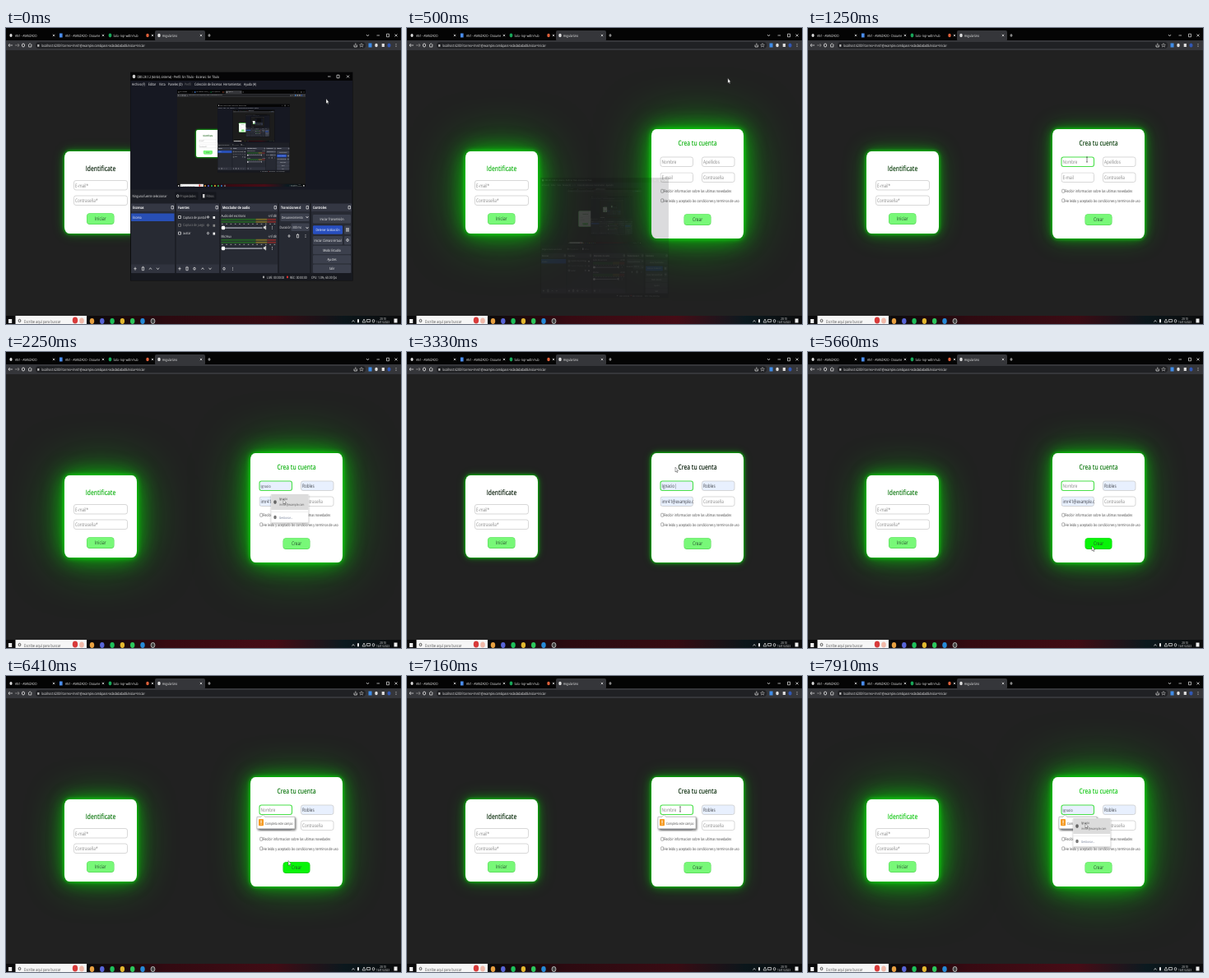
Recreate the animation shown at these times as an HTML page. Size 480 by 360 pixels, loop 8 s.

```html
<!DOCTYPE html>
<html lang="es">
<head>
<meta charset="utf-8">
<title>Formulario</title>
<style>
html, body { margin: 0; width: 100%; height: 100%; overflow: hidden; background: #212121; }
.card { position: absolute; background: #fff; border-radius: 6px / 8px; }
#login { left: 71px; top: 149.5px; width: 88px; height: 100.5px; }
#signup { left: 297px; top: 123px; width: 112px; height: 132.5px; }
svg { position: absolute; left: 0; top: 0; }
text { font-family: "Open Sans", "Noto Sans", sans-serif; text-rendering: geometricPrecision; white-space: pre; }
</style>
</head>
<body>
<div class="card" id="login"></div>
<div class="card" id="signup"></div>
<svg width="480" height="360" viewBox="0 0 480 360">
  <defs>
    <linearGradient id="tint">
      <stop offset="0" stop-color="#380a12" stop-opacity="0"/>
      <stop offset=".25" stop-color="#380a12"/>
      <stop offset=".6" stop-color="#480c16"/>
      <stop offset=".82" stop-color="#0b1a20"/>
      <stop offset="1" stop-color="#0b1a20" stop-opacity="0"/>
    </linearGradient>
    <filter id="soft" x="-50%" y="-50%" width="200%" height="200%"><feGaussianBlur stdDeviation="4"/></filter>
    <filter id="shade" x="-20%" y="-20%" width="140%" height="150%"><feGaussianBlur stdDeviation="1.2"/></filter>
    <clipPath id="mailClip"><rect x="307.5" y="175.5" width="40.5" height="12.5"/></clipPath>
    <clipPath id="screenClip"><rect width="480" height="360"/></clipPath>
  </defs>
  <g id="page"></g>
  <g id="bars"></g>
  <g id="obs"></g>
  <g id="pointer"></g>
</svg>
<script>
const LOOP = 8000, STEP = 1000 / 12, PULSE = 1750;
const NAME = 'Ignacio', SURNAME = 'Robles', MAIL = 'imr41@example.com';
const $ = id => document.getElementById(id);

const T = (x, y, s, size = 4.4, fill = '#f0f0f0', more = '') =>
  `<text transform="translate(${x} ${y}) scale(.75 1)" font-size="${size}" fill="${fill}" ${more}>${s}</text>`;
const C = (x, y, s, size, fill, more = '') => T(x, y, s, size, fill, `text-anchor="middle" ${more}`);
const R = (x, y, w, h, fill, rx = 0, more = '') =>
  `<rect x="${x}" y="${y}" width="${w}" height="${h}" rx="${rx}" fill="${fill}" ${more}/>`;
const D = (x, y, r, fill) => `<ellipse cx="${x}" cy="${y}" rx="${r * .8}" ry="${r}" fill="${fill}"/>`;
const P = (d, stroke = '#e8e8e8', w = .7, fill = 'none') =>
  `<path d="${d}" stroke="${stroke}" stroke-width="${w}" fill="${fill}"/>`;

const cross = (x, y, r = 1.2, c) => P(`M${x - r} ${y - r}l${2 * r} ${2 * r}m0 ${-2 * r}l${-2 * r} ${2 * r}`, c);
const plus = (x, y) => P(`M${x - 1.6} ${y}h3.2M${x} ${y - 2}v4`);
const bin = (x, y) => P(`M${x - 1.6} ${y - 1.6}h3.2m-.5 0v3.6h-2.2v-3.6m.6 -.8h1`);
const up = (x, y) => P(`M${x - 1.5} ${y + 1}l1.5 -2l1.5 2`);
const down = (x, y) => P(`M${x - 1.5} ${y - 1}l1.5 2l1.5 -2`);
const ring = (x, y, r = 1.5, c = '#e8e8e8') => `<ellipse cx="${x}" cy="${y}" rx="${r * .8}" ry="${r}" fill="none" stroke="${c}" stroke-width=".8"/>`;
const dots = (x, y, c = '#e8e8e8') => [-1.5, 0, 1.5].map(d => D(x, y + d, .5, c)).join('');

function browser() {
  let s = R(0, 0, 480, 15, '#040404') + R(181, 3, 61, 13, '#35363a', 2) + R(0, 15, 480, 12, '#35363a') +
    R(36, 17, 401, 8, '#202124', 4);
  s += D(6, 9, 2, '#ddd') + T(11, 10.5, 'AN1 - AVANZADO') + cross(58, 9);
  s += R(65, 6.5, 3.6, 5, '#4a8df0') + T(72, 10.5, 'AN1 - AVANZADO - Docume') + cross(118, 9);
  s += D(126.5, 9, 2.4, '#18a558') + T(130.5, 10.5, 'Sala - kqr-wdtn-hub') + D(172, 9, 2.2, '#e0603a') + cross(178, 9);
  s += D(186, 9, 2.2, '#ddd') + T(190, 10.5, 'AngularUno') + cross(237, 9) + plus(247, 9);
  s += down(439.5, 9) + P('M450.5 9h3.5M462.5 7.2h3v3.6h-3z') + cross(474, 9, 1.5);
  s += P('M8 21h-5l1.6 -2m-1.6 2l1.6 2') + P('M11 21h5l-1.6 -2m1.6 2l-1.6 2', '#999') + ring(21, 21, 2) +
    P('M27 21l2.2 -2.3l2.2 2.3m-.6 -.5v2.5h-3.2v-2.5');
  s += R(38.2, 20, 2.2, 2.8, '#bbb') + T(43, 22.6, `localhost:4200/?correo=${MAIL}&amp;pass=adadadadad&amp;Iniciar=Iniciar`, 4.5);
  s += P('M423 20.5v2.5h3.4v-2.5m-1.6 1v-3') + P('M432 18.6l.7 1.6h1.6l-1.2 1.2l.4 1.7l-1.5 -1l-1.5 1l.4 -1.7l-1.2 -1.2h1.6z', '#ccc', .5);
  return s + R(440.5, 18.5, 4, 5, '#3f8ce8') + D(450, 21, 2.2, '#ddd') + R(456.7, 19, 3.2, 4, '#ddd') + D(465.5, 21, 2.6, '#3158b5') + dots(474, 21);
}

function taskbar() {
  let s = R(0, 350, 480, 10, '#0a0a0b') + R(98, 350, 382, 10, 'url(#tint)', 0, 'class="tint"');
  s += R(3, 354, 4.2, 5, '#eee') + R(11.5, 350, 86.5, 10, '#f6f6f6') + ring(16.5, 356, 1.7, '#333') +
    T(22, 358.7, 'Escribe aquí para buscar', 5.2, '#555') + D(84, 355.5, 4, '#d83a3a') + D(92, 356, 3.5, '#f0b8a8');
  ['#e8a040', '#5865d8', '#1ec05a', '#e4b82e', '#2cc75c', '#2589d8'].forEach((c, i) => s += D(104.5 + i * 12.3, 356.5, 3.4, c));
  s += D(178.5, 356.5, 3.4, '#444') + ring(178.5, 356.5, 3, '#ccc');
  s += up(422, 356.5) + R(427, 354, 2, 4.5, '#eee', 1) + P('M433 358l2 -4l2 4z') + P('M438.5 354.5h4v3h-4z') + ring(446.5, 356.3, 1.7);
  return s + C(458, 354.7, '20:10', 4, '#eee') + C(458, 359.3, '16/01/2023', 4, '#eee') + R(471.5, 353.5, 4, 5, '#eee');
}

const field = (x, y, w, label, o = {}) =>
  R(x, y, w, 11.5, o.auto ? '#e8f0fe' : '#fff', 2.5, o.focus ? 'stroke="#4be04b" stroke-width="1.1"' : 'stroke="#c8c8c8" stroke-width=".7"') +
  T(x + 1.6, y + 8, o.value || label, o.small ? 4.8 : 6.2, o.value ? '#3a3d44' : '#858585');

const button = (x, y, w, label, hot) =>
  R(x, y + .3, w, 13.7, hot ? '#0ac80a' : '#52d652', 4) + R(x + .5, y + .6, w - 1, 12.7, hot ? '#08f408' : '#78f878', 3.6) +
  C(x + w / 2, y + 9.4, label, 6.4, '#244a2c');

const title = (x, y, s, c) => C(x, y, s, 8.9, c, 'font-weight="600"');

const login = c => title(115, 174, 'Identificate', c) + field(82.5, 185.5, 65, 'E-mail*') +
  field(82.5, 204, 65, 'Contraseña*') + button(98, 225, 33.5, 'Iniciar');

function miniScreen(depth) {
  return R(0, 0, 480, 360, '#1c1c1c') + R(70, 148.5, 90, 102.5, '#0f0', 8, 'filter="url(#soft)"') +
    R(71, 149.5, 88, 100.5, '#fff', 6) + login('#0c5a0c') + browser() + taskbar() + recorder(depth);
}

function recorder(depth) {
  const line = '#272a33', edge = '#3c404d', navy = '#161822';
  const key = (x, y, w, s, c = edge) => R(x, y, w, 10.4, c, 1.2) + C(x + w / 2, y + 6.8, s, 4.4, '#fff');
  let s = R(151.5, 54, 269.5, 253, '#1d1f26', 0, 'stroke="#08090b" stroke-width=".8"') + R(151.5, 54, 269.5, 10, '#050506') +
    D(155.5, 59, 2.3, '#ccc') + T(159.5, 60.7, 'OBS 28.1.2 (64-bit, sistema) - Perfil: Sin Título - Escenas: Sin Título', 4.4, '#fff') +
    P('M391 59h3.5M402 57.2h3v3.6h-3z') + cross(415.5, 59, 1.5) + R(151.5, 64, 269.5, 9, navy);
  [[153, 'Archivo (F)'], [173, 'Editar'], [186, 'Vista'], [197, 'Paneles (D)'], [217, 'Perfil'], [229, 'Colección de Escenas'],
    [264, 'Herramientas'], [289, 'Ayuda (H)']].forEach(([x, n]) => s += T(x, 70.2, n, 4.5, n == 'Perfil' ? '#777' : '#fff'));
  s += R(151.5, 73, 269.5, 123.5, navy) + R(208, 75, 156, 118, '#0d0d0f');
  if (depth) s += `<g transform="translate(208 75) scale(.325 .328)" clip-path="url(#screenClip)">${miniScreen(depth - 1)}</g>`;
  s += T(153.5, 206, 'Ninguna fuente seleccionar', 4.4) + R(205.5, 199.5, 28, 9.5, '#15171d', 1) + ring(208.7, 204.3) + T(211.5, 206, 'Propiedades', 4.4, '#999') +
    R(237, 199.5, 18.5, 9.5, '#15171d', 1) + R(239, 202, 2.5, 4.5, '#ccc') + T(243.5, 206, 'Filtros', 4.4, '#999');
  [[152, 53, 'Escenas'], [207, 52, 'Fuentes'], [261, 69, 'Mezclador de audio'], [332, 37, 'Transiciones d'], [371, 49, 'Controles']]
    .forEach(([x, w, n], i) => {
      s += R(x, 213.5, w, 10, '#343743') + T(x + 2, 220.3, n, 4.6, '#fff', 'font-weight="700"') + P(`M${x + w - 4} 216.5h2.5v3.5h-2.5z`) +
        R(x, 224, w, 74, line) + (i < 3 ? R(x, 287.5, w, 10.5, '#30333e') : '');
    });
  s += R(152, 225.5, 52.5, 9.5, '#284fb5') + T(154, 231.8, 'Escena', 4.4, '#fff');
  ['Captura de pantall', 'Captura de juego', 'avatar'].forEach((n, i) => {
    const y = 230 + i * 9.8, c = i == 1 ? '#888' : '#eee';
    s += P(`M209.5 ${y - 1.5}h3v3h-3z`, c) + T(215, y + 1.6, n, 4.4, c) + ring(245.5, y, 1.2, c) + R(251.5, y - 1, 2.6, 3, c);
  });
  ['Audio del escritorio', 'Mic/Aux'].forEach((n, i) => {
    const y = 229.8 + i * 25;
    s += T(261.5, y, n, 4.4) + T(318.5, y, '-inf dB', 4.4);
    [2, 5].forEach(d => s += R(261.5, y + d, 42, 2, '#255f25') + R(303.5, y + d, 14, 2, '#75692a') + R(317.5, y + d, 10.5, 2, '#7c2a2a'));
    for (let k = 0; k < 13; k++) s += R(262 + k * 5.3, y + 8, 1.6, 1.2, '#888');
    s += R(261.5, y + 12.7, 50, 1.2, '#b9bdc8') + R(262, y + 11, 4, 4.4, '#fff', 1) + P(`M313 ${y + 12}h1l1.8 -1.6v5l-1.8 -1.6h-1z`, '#ddd', .5, '#ddd') + dots(323.5, y + 13);
  });
  s += R(333.5, 225.5, 35, 9.6, edge, 1) + T(335, 232, 'Desvanecimiento', 4.3) + down(366, 230) + T(332.5, 243.8, 'Duración', 4.4) +
    R(346.5, 237.5, 22, 9.6, edge, 1) + T(348, 243.8, '300 ms', 4.4) + down(366, 243) + plus(344, 253) + bin(354.5, 253) + dots(364, 253);
  s += key(373, 227, 46, 'Iniciar Transmisión') + key(373, 240.3, 36, 'Detener Grabación', '#284fc0') + key(411, 240.3, 8, '') + R(413.5, 243, 1, 4.8, '#eee') + R(415.5, 243, 1, 4.8, '#eee') +
    key(373, 253, 36, 'Iniciar Cámara Virtual') + key(411, 253, 8, '') + ring(415, 258) + key(373, 264.8, 46, 'Modo Estudio') + key(373, 276.2, 46, 'Ajustes') + key(373, 287.5, 46, 'Salir');
  s += plus(157, 292.7) + bin(166.5, 292.7) + up(175.5, 292.7) + down(184.5, 292.7) + plus(211, 292.7) + bin(220, 292.7) + ring(229, 292.7) + up(239, 292.7) + down(248, 292.7) + ring(265, 292.7) + dots(275.5, 292.7);
  return s + R(151.5, 298.5, 269.5, 8.5, '#17191f') + D(313, 303, 1.4, '#aaa') + T(317, 304.8, 'LIVE: 00:00:00', 4.4) + D(342, 303, 1.4, '#d33') +
    T(345, 304.8, 'REC: 00:00:00', 4.4) + T(371, 304.8, 'CPU: 1.0%, 60.00 fps', 4.4);
}

const popup = hot => R(322, 174, 46, 35, '#000', 1, 'opacity=".25" filter="url(#shade)"') + R(322.3, 173, 45.2, 34.5, '#fff', 1) +
  (hot ? R(322.3, 173, 45.2, 19, '#dcdcdc') : '') + D(327, 182.6, 2.3, '#666') + T(332, 180.4, NAME, 4.1, '#444') +
  T(332, 187.4, MAIL, 4.1, '#555') + R(322.3, 194, 45.2, .5, '#ddd') + D(327, 201, 2.2, '#777') + T(332, 202.6, 'Gestionar...', 4.1, '#6d7892');

const warning = () => R(305.5, 172, 47, 16, '#000', 2, 'opacity=".5" filter="url(#shade)"') +
  P('M305 171.3h5l2.3 -2.6l2.3 2.6h36.4v14.5h-46z', '#a5a5a5', .6, '#fff') + R(307, 174, 6, 8.3, '#f59a23', 1) +
  R(309.6, 175.5, .9, 3.4, '#fff') + R(309.6, 179.7, .9, 1, '#fff') + T(315, 180.6, 'Completa este campo', 4.4, '#444');

const path = [[0, 389, 88], [250, 392, 59], [420, 392, 59], [1080, 339, 160], [1750, 339, 160], [2150, 337, 181], [2600, 337, 181],
  [3200, 326, 142], [5000, 326, 142], [5580, 345, 238], [6150, 345, 238], [6900, 332, 162], [7450, 332, 162], [7800, 337, 181], [LOOP, 337, 181]];
const ease = k => k * k * (3 - 2 * k);

function pointerAt(t) {
  const i = path.findIndex(p => p[0] > t), [t0, x0, y0] = path[i - 1], [t1, x1, y1] = path[i];
  const k = ease((t - t0) / (t1 - t0));
  return [x0 + (x1 - x0) * k, y0 + (y1 - y0) * k];
}

function pointer(x, y) {
  if (x > 308 && x < 347.5 && y > 157 && y < 168.5)
    return P(`M${x - 1} ${y - 3}h2m-1 0v6m-1 0h2`, '#333', .6);
  return P(`M${x} ${y - 2}v6l1.2 -1.2l.9 1.9l.8 -.4l-.8 -1.8h1.5z`, '#222', .4, '#fff');
}

function signup(t, color, x, y) {
  const within = (a, b) => t >= a && t < b;
  const preview = within(2080, 2500) || t >= 7740;
  const filled = t >= 2080, focus = t >= 1080;
  const left = Math.max(0, 7 - Math.max(0, Math.floor((t - 4350) / 110)));
  const name = preview ? NAME : t >= 2500 ? NAME.slice(0, left) : '';
  const caret = name && !preview && t % 1000 < 510 ? '|' : '';
  const hot = x > 337 && x < 369.5 && y > 226 && y < 240;
  let s = title(353, 143, 'Crea tu cuenta', color);
  s += field(308, 157, 39.5, 'Nombre', { value: name + caret, focus, small: preview, auto: preview || (name && left == 7) });
  s += field(358.5, 157, 39.5, 'Apellidos', { value: filled && SURNAME, auto: filled });
  s += `<g clip-path="url(#mailClip)">${field(308, 176, 39.5, 'E-mail', { value: filled && MAIL, auto: filled })}</g>` + field(358.5, 176, 39.5, 'Contraseña');
  ['Recibir informacion sobre las ultimas novedades', 'He leido y aceptado las condiciones y terminos de uso'].forEach((n, i) => {
    const top = 196.3 + i * 11.5;
    s += R(308.7, top, 3, 4, '#fff', .6, 'stroke="#666" stroke-width=".5"') + T(312.3, top + 4, n, 4.85, '#444');
  });
  s += button(336.5, 226, 33, 'Crear', hot);
  if (t >= 6000) s += warning();
  if (within(1750, 2500) || within(4410, 5200) || t >= 7450) s += popup(preview);
  return s;
}

$('bars').innerHTML = browser() + taskbar();
$('obs').innerHTML = recorder(3);
const tint = $('bars').querySelector('.tint');

function draw(now) {
  const t = Math.floor((now % LOOP) / STEP + .01) * STEP;
  const glow = (1 - Math.cos((t + 170) / PULSE * 2 * Math.PI)) / 2;
  const color = `rgb(${Math.round(8 + 14 * glow)},${Math.round(28 + 185 * glow ** 1.4)},${Math.round(10 + 14 * glow)})`;
  const green = a => `rgba(0,255,0,${a})`;
  const shadow = `0 0 ${3 + 4 * glow}px ${green(.9)}, 0 0 ${6 + 22 * glow}px ${green(.4 + .3 * glow)}, 0 0 ${10 + 62 * glow}px ${green(.2 + .35 * glow)}`;
  $('login').style.boxShadow = $('signup').style.boxShadow = shadow;
  const [x, y] = pointerAt(t);
  $('page').innerHTML = login(color) + signup(t, color, x, y);
  tint.setAttribute('opacity', .7 + .3 * glow);

  // The recorder shrinks away towards the taskbar.
  const away = Math.min(1, Math.max(0, (t - 330) / 200));
  $('obs').style.display = away < 1 ? '' : 'none';
  $('obs').setAttribute('opacity', 1 - away);
  $('obs').setAttribute('transform', `translate(${89 * away} ${178 * away}) scale(${1 - away * .5})`);
  $('pointer').innerHTML = t > 4250 && t < 4990 ? '' : pointer(x, y);
}

let start;
function tick(now) {
  start ??= now;
  draw(now - start);
  requestAnimationFrame(tick);
}
draw(0);
requestAnimationFrame(tick);
</script>
</body>
</html>
```
